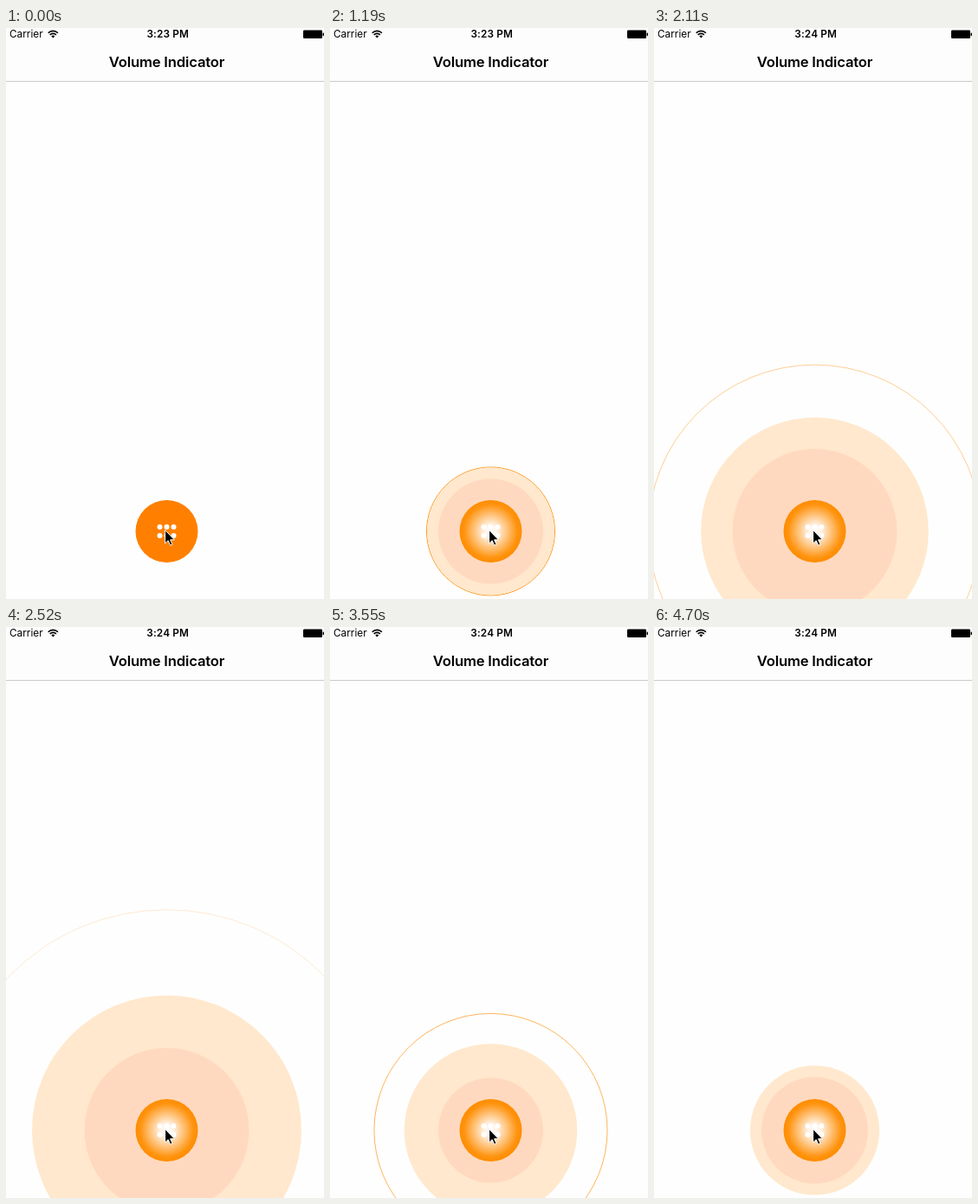
Write an HTML page that moves like this. It is 367 by 658 pixels and loops after 4.91 s.

```html
<!DOCTYPE html>
<html lang="en">
<head>
<meta charset="utf-8">
<title>Volume Indicator</title>
<style>
  html, body { margin: 0; width: 100%; height: 100%; overflow: hidden; background: #fefefe; }
  svg { display: block; width: 367px; height: 658px; }
  text { font-family: Inter, Roboto, sans-serif; fill: #000; }
  .status { font-size: 11.8px; }
  .clock { font-weight: 600; letter-spacing: .15px; }
  .title { font-size: 16.6px; font-weight: 600; letter-spacing: -.15px; }
</style>
</head>
<body>
<svg viewBox="0 0 367 658">
  <defs>
    <radialGradient id="glow">
      <stop offset="0" stop-color="#fff"/>
      <stop offset=".2" stop-color="#fff3e8"/>
      <stop offset=".85" stop-color="#ff9410"/>
      <stop offset="1" stop-color="#ff8c00"/>
    </radialGradient>
  </defs>

  <rect width="367" height="658" fill="#fefefe"/>
  <rect width="367" height="61" fill="#fdfdfd"/>
  <rect y="61" width="367" height="1" fill="#cacaca"/>

  <text class="status" x="4" y="11.4">Carrier</text>
  <g fill="none" stroke="#000" stroke-width="1.6">
    <path d="M48.7 5.7a8 8 0 0 1 11.2 0"/>
    <path d="M50.7 7.9a5 5 0 0 1 7.2 0"/>
  </g>
  <path d="M54.3 11.6l-2-2.2a3 3 0 0 1 4 0z"/>
  <text class="status clock" id="clock" x="186.7" y="11.4" text-anchor="middle">3:23 PM</text>
  <rect x="343" y="2.5" width="22" height="9.5" rx="1.3"/>
  <rect x="365.6" y="5.4" width="1.4" height="3.8" rx=".6"/>
  <text class="title" x="185.5" y="45" text-anchor="middle">Volume Indicator</text>

  <g transform="translate(185.5 580)">
    <circle id="ring" fill="none" stroke="#ff8a00"/>
    <circle id="outer" fill="#ffe8cd"/>
    <circle id="inner" fill="#ffd9bf"/>
    <circle id="button" r="36" fill="#ff8000"/>
    <g id="dots" fill="#fff"></g>
  </g>

  <path transform="translate(183.6 578.6)" stroke="#fff" stroke-width="1"
    d="M0 0V15.3L3.6 12.1L6 17.6L8.4 16.5L6 11.2H10.8Z"/>
</svg>

<script>
const LOOP = 4910, PRESS = 840, MINUTE = 2000;
const el = id => document.getElementById(id);
const ring = el('ring'), outer = el('outer'), inner = el('inner');

for (const y of [-5, 5]) for (const x of [-8, 0, 8]) {
  const dot = document.createElementNS('http://www.w3.org/2000/svg', 'circle');
  dot.setAttribute('cx', x);
  dot.setAttribute('cy', y);
  dot.setAttribute('r', 3);
  el('dots').append(dot);
}

// Runs of screen updates: first time, last time, count
const runs = [
  [840, 1020, 3], [1190, 1710, 10], [1770, 2290, 10], [2340, 2750, 8],
  [3040, 3550, 10], [3610, 4080, 9], [4140, 4640, 10], [4700, 4700, 1]
];
const ticks = [0];
for (const [from, to, n] of runs)
  for (let i = 0; i < n; i++)
    ticks.push(Math.round((from + (to - from) * i / Math.max(1, n - 1)) / 10) * 10);

// Disc radii over time: [ms, radius]
const outerKeys = [[800, 36], [1020, 72.3], [1190, 73.4], [1566, 73.4], [2266, 155.5],
  [3020, 155.5], [3800, 73.5], [4570, 73.5], [4640, 74.6]];
const innerKeys = [[800, 36], [1000, 60.5], [1620, 60.5], [2040, 95],
  [3010, 95], [3260, 60.5], [4570, 60.5], [4640, 61.5]];

function at(keys, t) {
  const i = keys.findIndex(k => k[0] > t);
  if (i < 0) return keys[keys.length - 1][1];
  if (i === 0) return keys[0][1];
  const [t0, a] = keys[i - 1], [t1, b] = keys[i];
  return a + (b - a) * (t - t0) / (t1 - t0);
}

// Waves start behind the discs and fade as they spread
const waves = [1190, 3103];
const waveRadius = age => 74 + age * .1355;

function draw(t) {
  const pressed = t >= PRESS;
  el('button').setAttribute('fill', pressed ? 'url(#glow)' : '#ff8000');
  el('clock').textContent = t < MINUTE ? '3:23 PM' : '3:24 PM';
  outer.setAttribute('r', pressed ? at(outerKeys, t) : 0);
  inner.setAttribute('r', pressed ? at(innerKeys, t) : 0);

  const start = waves.find(s => t - s > -350 && t - s < 1557);
  const r = start ? waveRadius(t - start) : 0;
  ring.setAttribute('r', r);
  ring.setAttribute('stroke-opacity', r ? Math.min(1, (300 - r) / 260) : 0);
}

function frame() {
  const t = performance.now() % LOOP;
  draw(ticks.findLast(s => s <= t));
  requestAnimationFrame(frame);
}
frame();
</script>
</body>
</html>
```
